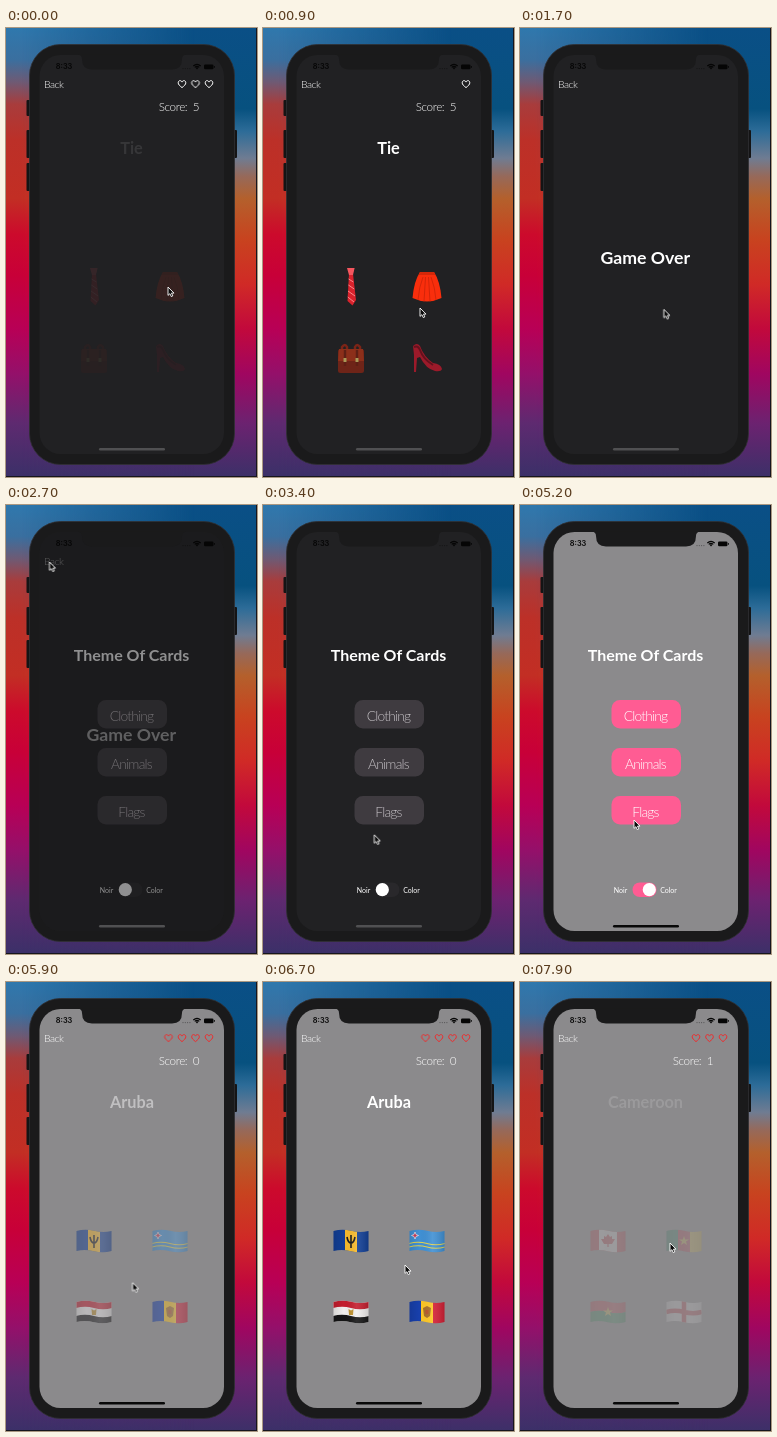
Recreate the animation shown at these times as an HTML page. Size 251 by 449 pixels, loop 8000 ms.

```html
<!DOCTYPE html>
<html lang="en">
<head>
<meta charset="utf-8">
<title>Picture card game</title>
<style>
html, body { margin: 0; width: 100%; height: 100%; overflow: hidden; }
body {
  position: relative;
  background: linear-gradient(#0a4f86 0, #07517f 18%, #2d6c98 23%, #6f7c92 29%, #96695a 33%, #b4602c 38%, #c8431f 47%, #d02a26 57%, #c2093c 67%, #a00660 77%, #6c2270 88%, #3c3068);
}
body::before {
  content: ""; position: absolute; inset: 0;
  background: linear-gradient(#2f78ad 0, #3a6f9f 7%, #6e5a74 12%, #a83c3c 17%, #bc3028 25%, #c22e24 38%, #cc0a2c 46%, #c80038 55%, #b80056 67%, #94106a 77%, #5e2a70 88%, #3b3068);
  -webkit-mask-image: linear-gradient(90deg, #000 6%, transparent 75%);
  mask-image: linear-gradient(90deg, #000 6%, transparent 75%);
}
body::after { content: ""; position: absolute; inset: 0; box-shadow: inset -1px -1px #16161e; }
svg { position: absolute; inset: 0; width: 100%; height: 100%; display: block; }
text { font-family: Lato, "Open Sans", sans-serif; fill: #fff; white-space: pre; }
.mid { text-anchor: middle; }
.word { font-size: 16.3px; font-weight: 700; text-anchor: middle; }
.title { font-size: 16px; font-weight: 700; text-anchor: middle; }
.over { font-size: 17.7px; }
.label { font-size: 13.8px; font-weight: 300; letter-spacing: -.8px; text-anchor: middle; }
.back { font-size: 10.4px; font-weight: 300; letter-spacing: -.5px; }
.score { font-size: 11.7px; font-weight: 300; letter-spacing: -.4px; text-anchor: middle; }
.tiny { font-size: 7px; }
.clock { font: 600 7.4px Inter, sans-serif; fill: #050505; }

[class*="t-"] { animation: 8s linear infinite; }

/* Colour themes, switched at once */
.t-ground { animation-name: ground; animation-timing-function: step-end; }
.t-home { animation-name: home; animation-timing-function: step-end; }
.t-button { animation-name: button; animation-timing-function: step-end; }
.t-label { animation-name: label; animation-timing-function: step-end; }
@keyframes ground { 0% { fill: #212123 } 46.25% { fill: #8b8a8c } }
@keyframes home { 0% { fill: #505052 } 46.25% { fill: #080808 } }
@keyframes button { 0% { fill: #3f3b40 } 46.25% { fill: #ff5c93 } }
@keyframes label { 0% { fill: #c4c0c4 } 46.25% { fill: #fff } }

/* Pages */
.t-dark { animation-name: dark; }
.t-menu { animation-name: menu; }
.t-light { animation-name: light; }
.t-dim { animation-name: dim; }
@keyframes dark { 0%, 31.25% { opacity: 1 } 35.25%, 100% { opacity: 0 } }
@keyframes menu { 0%, 31.25% { opacity: 0 } 35.25%, 68.75% { opacity: 1 } 73%, 100% { opacity: 0 } }
@keyframes light { 0%, 68.75% { opacity: 0 } 73%, 100% { opacity: 1 } }
@keyframes dim { 0%, 31.25% { opacity: 0 } 33.5% { opacity: .2 } 35.25%, 100% { opacity: 0 } }

/* Rounds */
.t-tie { animation-name: tie; }
.t-hud { animation-name: hud; animation-timing-function: step-end; }
.t-over { animation-name: over; }
.t-aruba { animation-name: aruba; }
.t-cameroon { animation-name: cameroon; }
@keyframes tie { 0% { opacity: .1 } 6%, 14.5% { opacity: 1 } 16%, 100% { opacity: 0 } }
@keyframes hud { 0% { opacity: 1 } 15% { opacity: 0 } }
@keyframes over { 0%, 15.5% { opacity: 0 } 19%, 100% { opacity: 1 } }
@keyframes aruba { 0%, 71% { opacity: 0 } 77%, 94.5% { opacity: 1 } 96.5%, 100% { opacity: 0 } }
@keyframes cameroon { 0%, 97.5% { opacity: 0 } 98.75% { opacity: .14 } 100% { opacity: .36 } }

/* Score and lives */
.t-zero { animation: zero 8s step-end infinite; }
.t-one { animation: one 8s step-end infinite; }
.t-life1 { animation: life1 8s step-end infinite; }
.t-life2 { animation: life2 8s step-end infinite; }
.t-life3 { animation: life3 8s step-end infinite; }
@keyframes zero { 0% { opacity: 1 } 95% { opacity: 0 } }
@keyframes one { 0% { opacity: 0 } 95% { opacity: 1 } }
@keyframes life1 { 0% { opacity: 1 } 3.75% { opacity: 0 } }
@keyframes life2 { 0% { opacity: 1 } 8.75% { opacity: 0 } }
@keyframes life3 { 0% { opacity: 1 } 88.75% { opacity: 0 } }

/* Switch and pointer */
.t-track { animation-name: track; }
.t-knob { animation-name: knob; }
@keyframes track { 0%, 46.2% { fill: #29282b } 46.25% { fill: #8b8a8c } 49%, 100% { fill: #ff5c93 } }
@keyframes knob {
  0%, 46.25% { transform: translateX(0); animation-timing-function: ease-out }
  49.5%, 100% { transform: translateX(10px) }
}
.t-pointer { animation-name: pointer; animation-timing-function: ease-in-out; }
@keyframes pointer {
  0% { transform: translate(162px, 259px) }
  5% { transform: translate(161px, 263px) }
  8.5% { transform: translate(158px, 275px) }
  11.25% { transform: translate(157px, 280px) }
  14%, 18% { transform: translate(162px, 322px) }
  30%, 35% { transform: translate(43.5px, 57px) }
  45.5%, 51% { transform: translate(125px, 385px) }
  62%, 70% { transform: translate(114px, 315px) }
  78%, 84% { transform: translate(142px, 283px) }
  88%, 89.5% { transform: translate(152px, 321px) }
  94.5%, 100% { transform: translate(150px, 261px) }
}
</style>
</head>
<body>
<svg viewBox="0 0 251 449">
  <defs>
    <path id="heart" d="M0 3.6C-2.4 1.7-3.8.4-3.8-1.2C-3.8-3.7-1-4.2 0-1.9C1-4.2 3.8-3.7 3.8-1.2C3.8.4 2.4 1.7 0 3.6Z" fill="none" stroke-width="1"/>
    <clipPath id="wave"><path d="M-17.5-10Q-9-12.5 0-10.3T17.5-10V10Q9 12.5 0 10.3T-17.5 10Z"/></clipPath>
    <linearGradient id="sheen">
      <stop offset="0" stop-color="#000" stop-opacity=".12"/>
      <stop offset=".3" stop-color="#000" stop-opacity="0"/>
      <stop offset=".65" stop-color="#fff" stop-opacity=".1"/>
      <stop offset="1" stop-color="#000" stop-opacity=".15"/>
    </linearGradient>
    <rect id="shade" x="-18" y="-14" width="36" height="28" fill="url(#sheen)"/>
    <clipPath id="glass"><rect x="33.5" y="27" width="184.5" height="399" rx="21"/></clipPath>
  </defs>

  <!-- Phone -->
  <g fill="#141415">
    <rect x="20.5" y="72" width="5" height="16" rx="1"/>
    <rect x="20.5" y="102" width="5" height="28" rx="1"/>
    <rect x="20.5" y="135" width="5" height="28" rx="1"/>
    <rect x="227" y="102" width="4" height="28" rx="1"/>
  </g>
  <rect x="23.5" y="16.5" width="205" height="420" rx="31" fill="#1a1a1b" stroke="#303034" stroke-width=".8"/>
  <rect class="t-ground" x="33.5" y="27" width="184.5" height="399" rx="21"/>

  <g clip-path="url(#glass)">
    <!-- Dark game -->
    <g class="t-dark">
      <text class="back" x="38" y="60">Back</text>
      <g class="t-hud">
        <text class="score" x="173" y="83">Score:  5</text>
        <g stroke="#fff">
          <use class="t-life1" href="#heart" x="176" y="56"/>
          <use class="t-life2" href="#heart" x="189.5" y="56"/>
          <use href="#heart" x="203" y="56"/>
        </g>
      </g>
      <g class="t-tie">
        <text class="word" x="125.5" y="126">Tie</text>
        <g transform="translate(88 259)">
          <path d="M-2-13H2L5 13L1.5 18.5L-3.5 14Z" fill="#d9222c"/>
          <path d="M-2.4-8L2.4-5M-2.6-2L3.2 2M-3 4L4 9M-3.2 10L3 15" stroke="#ff858a"/>
          <path d="M-4-19H3.6L2-12H-2Z" fill="#f5565e"/>
        </g>
        <g transform="translate(164 259)">
          <path d="M-7-15H7Q13-6 14.5 11Q0 18-14.5 11Q-13-6-7-15Z" fill="#f92e0c"/>
          <path d="M-4-10Q-8 0-9 13M-1.5-10L-3 14.5M1.5-10L3 14.5M4-10Q8 0 9 13" fill="none" stroke="#d02409" stroke-width=".9"/>
          <path d="M-7-15H7L8.3-12H-8.3Z" fill="#d42709"/>
        </g>
        <g transform="translate(88 330)">
          <path d="M-9-5V-11Q-6-15-4-11V-5M4-5V-11Q6-15 9-11V-5" fill="none" stroke="#7c2417" stroke-width="2.5"/>
          <rect x="-13" y="-9" width="26" height="24" rx="2.5" fill="#6e2418"/>
          <path d="M-12-9H12L13 3H-13Z" fill="#8c2f1a"/>
          <path d="M-6-8V8M6-8V8" stroke="#5e2015" stroke-width="2.4"/>
          <path d="M-7.5 0H-4.5V4H-7.5ZM4.5 0H7.5V4H4.5Z" fill="#a99857"/>
        </g>
        <g transform="translate(164 330)">
          <path d="M-14-12Q-10-16-7-12Q-3-1 6 5Q14 6 15 11Q14 14 8 13Q-1 11-7-1L-10 0L-11 14H-13L-13-3Z" fill="#9c1a2a"/>
          <path d="M-13-11Q-9-13-7-8Q-4 1 6 7" fill="none" stroke="#64111d" stroke-width="2"/>
        </g>
      </g>
      <text class="title over t-over" x="125.3" y="236">Game Over</text>
    </g>

    <!-- Theme menu -->
    <g class="t-menu">
      <text class="title" x="125.5" y="156">Theme Of Cards</text>
      <g class="t-button">
        <rect x="91.5" y="195" width="69.5" height="28.5" rx="8.5"/>
        <rect x="91.5" y="243" width="69.5" height="28.5" rx="8.5"/>
        <rect x="91.5" y="291" width="69.5" height="28.5" rx="8.5"/>
      </g>
      <text class="label t-label" x="125.5" y="215.5">Clothing</text>
      <text class="label t-label" x="125.5" y="263.5">Animals</text>
      <text class="label t-label" x="125.5" y="311.5">Flags</text>
      <text class="tiny mid" x="100.5" y="387.5">Noir</text>
      <text class="tiny mid" x="148.5" y="387.5">Color</text>
      <rect class="t-track" x="112.5" y="377.5" width="24" height="14.5" rx="7.25"/>
      <circle class="t-knob" cx="119.3" cy="384.7" r="6.6" fill="#fff"/>
    </g>

    <!-- Light game -->
    <g class="t-light">
      <text class="back" x="38" y="60">Back</text>
      <text class="score t-zero" x="173" y="83">Score:  0</text>
      <text class="score t-one" x="173" y="83">Score:  1</text>
      <g stroke="#ef2a2c">
        <use class="t-life3" href="#heart" x="162.5" y="56"/>
        <use href="#heart" x="176" y="56"/>
        <use href="#heart" x="189.5" y="56"/>
        <use href="#heart" x="203" y="56"/>
      </g>

      <g class="t-aruba">
        <text class="word" x="126" y="126">Aruba</text>
        <g transform="translate(88 259)"><g clip-path="url(#wave)">
          <path d="M-18-14H18V14H-18Z" fill="#123f96"/>
          <path d="M-6-14H6V14H-6Z" fill="#f6b92c"/>
          <path d="M0-6V7M-4-4Q-3 2 0 2Q3 2 4-4" fill="none" stroke="#17181c" stroke-width="1.6"/>
          <use href="#shade"/>
        </g></g>
        <g transform="translate(164 259)"><g clip-path="url(#wave)">
          <path d="M-18-14H18V14H-18Z" fill="#4090d4"/>
          <path d="M-18 2.5Q-9 0 0 2.5T18 2.5M-18 6Q-9 3.5 0 6T18 6" fill="none" stroke="#e2d350" stroke-width="1.2"/>
          <path d="M-12-9L-11-6.5L-8.5-5.5L-11-4.5L-12-2L-13-4.5L-15.5-5.5L-13-6.5Z" fill="#c83a58" stroke="#fff" stroke-width=".6"/>
          <use href="#shade"/>
        </g></g>
        <g transform="translate(88 330)"><g clip-path="url(#wave)">
          <path d="M-18-14H18V14H-18Z" fill="#f1efee"/>
          <path d="M-18-14H18V-4Q9-1.5 0-4T-18-4Z" fill="#c41e2e"/>
          <path d="M-18 4Q-9 1.5 0 4T18 4V14H-18Z" fill="#151516"/>
          <path d="M-2.5-3L0-1.5L2.5-3L2 3H-2Z" fill="#bd912f"/>
          <use href="#shade"/>
        </g></g>
        <g transform="translate(164 330)"><g clip-path="url(#wave)">
          <path d="M-18-14H-6V14H-18Z" fill="#1840ac"/>
          <path d="M-6-14H6V14H-6Z" fill="#fcc624"/>
          <path d="M6-14H18V14H6Z" fill="#d31f35"/>
          <path d="M-4-4L0-6L4-4L3 4L0 6L-3 4Z" fill="#a87028"/>
          <path d="M-1.5-2H1.5V2H-1.5Z" fill="#b8552c"/>
          <use href="#shade"/>
        </g></g>
      </g>

      <g class="t-cameroon">
        <text class="word" x="125.5" y="126">Cameroon</text>
        <g transform="translate(88 259)"><g clip-path="url(#wave)">
          <path d="M-18-14H18V14H-18Z" fill="#d9202e"/>
          <path d="M-9-14H9V14H-9Z" fill="#fff"/>
          <path d="M0-7L2-4L4-5L4-2L7-2L4 3H.6V6H-.6V3H-4L-7-2L-4-2L-4-5L-2-4Z" fill="#d9202e"/>
          <use href="#shade"/>
        </g></g>
        <g transform="translate(164 259)"><g clip-path="url(#wave)">
          <path d="M-18-14H-6V14H-18Z" fill="#0d7a50"/>
          <path d="M-6-14H6V14H-6Z" fill="#cd1b30"/>
          <path d="M6-14H18V14H6Z" fill="#f6cf2a"/>
          <path d="M0-5L1.2-1.6H5L2 .5L3 4L0 2L-3 4L-2 .5L-5-1.6H-1.2Z" fill="#f6cf2a"/>
          <use href="#shade"/>
        </g></g>
        <g transform="translate(88 330)"><g clip-path="url(#wave)">
          <path d="M-18-14H18V0Q9 2.5 0 0T-18 0Z" fill="#dd2534"/>
          <path d="M-18 0Q-9-2.5 0 0T18 0V14H-18Z" fill="#138a43"/>
          <path d="M0-5L1.2-1.6H5L2 .5L3 4L0 2L-3 4L-2 .5L-5-1.6H-1.2Z" fill="#f8d431"/>
          <use href="#shade"/>
        </g></g>
        <g transform="translate(164 330)"><g clip-path="url(#wave)">
          <path d="M-18-14H18V14H-18Z" fill="#fafafa"/>
          <path d="M0-14V14M-18 0Q-9-2.5 0 0T18 0" fill="none" stroke="#d9202e" stroke-width="4.5"/>
          <use href="#shade"/>
        </g></g>
      </g>
    </g>

    <rect class="t-dim" x="33" y="27" width="185" height="399"/>
    <rect class="t-home" x="93" y="420" width="66" height="2.6" rx="1.3"/>

    <!-- Status bar -->
    <text class="clock" x="49.8" y="41.3">8:33</text>
    <g fill="#050505">
      <g opacity=".4">
        <circle cx="177" cy="40.6" r=".6"/>
        <circle cx="179.3" cy="40.6" r=".6"/>
        <circle cx="181.6" cy="40.6" r=".6"/>
        <circle cx="183.9" cy="40.6" r=".6"/>
      </g>
      <path d="M191 41.5L189.5 39.8Q191 38.6 192.5 39.8Z"/>
      <rect x="198" y="36.5" width="9.5" height="4.8" rx="1.3"/>
      <rect x="208" y="38" width=".8" height="1.8"/>
    </g>
    <path d="M187.3 38Q191 34.6 194.7 38M188.7 39.4Q191 37.4 193.3 39.4" fill="none" stroke="#050505" stroke-width="1.1"/>
  </g>
  <path d="M72 26.5Q76 27 76 31Q76 41.5 86 41.5H166Q176 41.5 176 31Q176 27 180 26.5Z" fill="#1a1a1b"/>

  <path class="t-pointer" d="M0 0V8.4L1.9 6.7L3.3 9.6L4.8 8.9L3.5 6.1H6Z" fill="#0a0a0a" stroke="#fff" stroke-width=".9" stroke-linejoin="round"/>
</svg>
</body>
</html>
```
